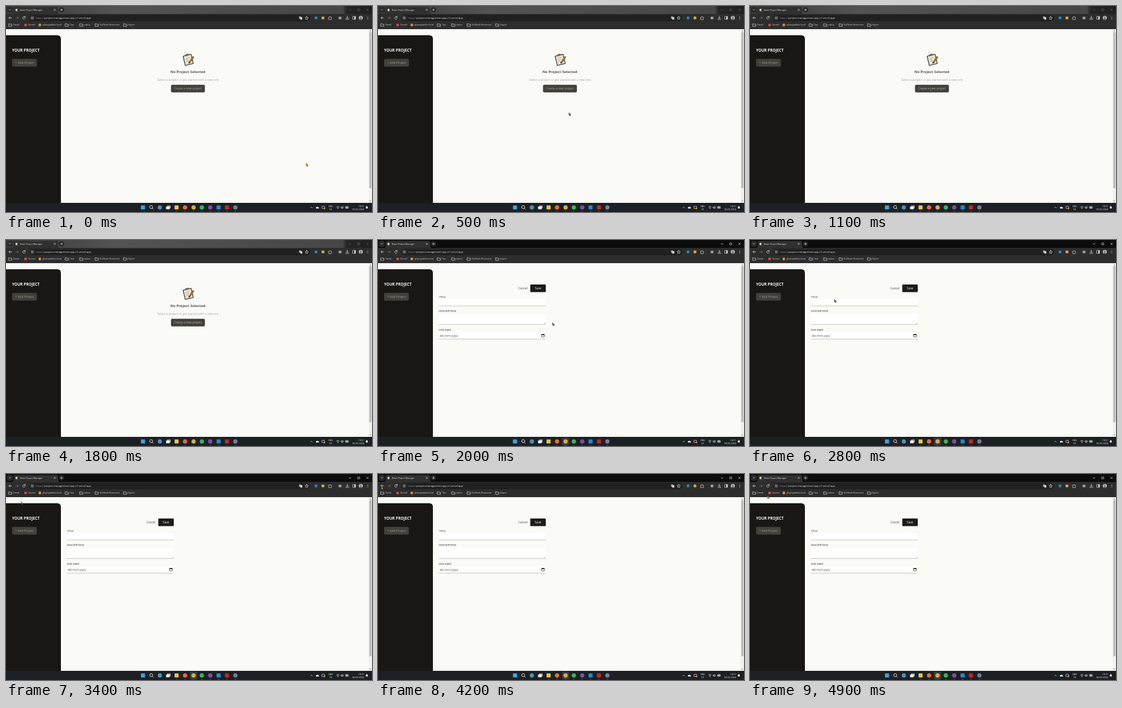
An HTML page for the animation above (5 s loop, 600 px wide and 338 px high).

```html
<!DOCTYPE html>
<html lang="en">
<head>
<meta charset="utf-8">
<title>Project manager demo</title>
<style>
html, body { margin: 0; width: 100%; height: 100%; overflow: hidden; background: #fafaf7; }
svg { display: block; width: 600px; height: 338px; font-family: "Open Sans", "Noto Sans", sans-serif; }
text { white-space: pre; }
.line { fill: none; stroke: #d8d8d8; stroke-width: .7; stroke-linecap: round; stroke-linejoin: round; }
</style>
</head>
<body>
<svg id="stage" viewBox="0 0 600 338"></svg>
<script>
const stage = document.getElementById('stage');

const rect = (x, y, w, h, fill, r = 0, more = '') =>
  `<rect x="${x}" y="${y}" width="${w}" height="${h}" rx="${r}" fill="${fill}" ${more}/>`;
const dot = (x, y, r, fill, more = '') => `<circle cx="${x}" cy="${y}" r="${r}" fill="${fill}" ${more}/>`;
const line = (d, more = '') => `<path class="line" d="${d}" ${more}/>`;
const text = (x, y, size, fill, str, weight = 400, anchor = 'start') =>
  `<text x="${x}" y="${y}" font-size="${size}" fill="${fill}" font-weight="${weight}" text-anchor="${anchor}">${str}</text>`;
const group = (id, body) => `<g id="${id}">${body}</g>`;

const folder = x => line(`M${x - 2.4} 29.2h1.8l.7.8h2.5v3.2h-5z`);

function clipboard(x, y, scale) {
  return `<g transform="translate(${x} ${y}) scale(${scale})">
    <g transform="rotate(-14)">
      ${rect(-6.8, -7.2, 13.6, 15.6, '#3d3427', 1)}
      ${rect(-5.7, -6, 11.4, 13.3, '#e9e2cc', .4)}
      ${rect(-2.8, -8.4, 5.6, 2.8, '#6d6657', .8)}
      <path d="M-3.8-2.5h6M-3.8 0h5M-3.8 2.5h4" stroke="#aaa38e" stroke-width=".6"/>
    </g>
    <path d="M8.3-4.3L1.8 4.8" stroke="#35291c" stroke-width="2.4"/>
    <path d="M8-4L2.2 4.2" stroke="#c79645" stroke-width="1.2"/>
    <path d="M.8 3.9L2.8 5.3L.6 6.6z" fill="#35291c"/>
  </g>`;
}

function tabStrip() {
  return rect(0, 0, 600, 13, '#0c0c0c')
    + group('inactive', rect(0, 0, 600, 13, 'url(#strip)'))
    + rect(1.5, 1.5, 9.5, 9.5, '#2b2b2b', 3)
    + line('M4.9 5.6l1.4 1.4l1.4-1.4')
    + `<path d="M10 13q2.5 0 2.5-3V4q0-2.5 2.5-2.5h68q2.5 0 2.5 2.5v6q0 3 2.5 3z" fill="#303030"/>`
    + clipboard(17.3, 6.4, .28)
    + text(22.7, 7.7, 3.55, '#e4e4e4', 'React Project Manager')
    + line('M78.8 5.1l2.4 2.4m0-2.4l-2.4 2.4')
    + dot(91, 6.3, 4.3, '#272727')
    + line('M89.3 6.3h3.4M91 4.6v3.4')
    + group('controls', line('M562.5 6.4h3M577 4.9h2.9v2.9h-2.9zM591.2 4.8l3 3m0-3l-3 3'));
}

function toolbar() {
  return rect(0, 13, 600, 25, '#2d2d2d')
    + line('M9.2 19.5H4.8m2-2l-2 2l2 2')
    + line('M15.8 19.5h4.4m-2-2l2 2l-2 2', 'opacity=".4"')
    + line('M31.4 18.4a2.2 2.2 0 1 0 .2 2M31.6 16.7v1.9h-1.9')
    + rect(37.5, 14.5, 461, 10.5, '#202020', 5.2)
    + dot(43, 19.6, 4, '#343434')
    + line('M41.4 18.5h1.2m1 0h1M41.4 20.7h.8m1 0h1.6')
    + text(49, 21.1, 4.18, '#e8e8e8', '<tspan fill="#909090">https://</tspan>project-management-app-v1.vercel.app')
    + rect(480.3, 17, 3.3, 4, '#9a9a9a', .4) + rect(482.4, 18.3, 3.3, 4, '#dedede', .4)
    + line('M493 17l.8 1.7l1.9.2l-1.4 1.3l.4 1.9l-1.7-1l-1.7 1l.4-1.9l-1.4-1.3l1.9-.2z')
    + dot(508.3, 19.5, 2.5, '#2383b8') + dot(519.6, 19.5, 2.5, '#d6a43c')
    + line('M529.3 18.2h1.4q.6-2 1.3 0h1.4v1.3q1.5.7 0 1.4v1.3h-4.1z')
    + rect(545.6, 17.7, 4, 3.8, '#dedede', .5) + dot(547.6, 19.6, 1, '#2d2d2d')
    + line('M559.5 16.7v3.6m-1.5-1.4l1.5 1.5l1.5-1.5M557.2 21v1h4.6v-1')
    + line('M568.8 17.2h4.2v4.6h-4.2z') + rect(571, 17, 2, 5, '#dedede')
    + dot(581.7, 19.5, 3.2, '#c9c4bd') + dot(581.7, 18.5, 1.1, '#493e38')
    + `<path d="M579.7 21.7q2-3 4 0q-2 1.4-4 0z" fill="#493e38"/>`
    + [17.7, 19.5, 21.3].map(y => dot(593, y, .55, '#dedede')).join('');
}

function bookmarks() {
  const items = [[12, 'Tarvik'], [36.5, 'Qumel'], [60, 'phpmyadmin local'], [105, 'Tavi'],
    [128, 'sarivu'], [153.5, 'FullStack Resources'], [200.5, 'Expire']];
  return items.map(([x, name]) => text(x, 32.4, 3.6, '#dddddd', name)).join('')
    + [7, 99.8, 123.5, 148.8, 195.5].map(folder).join('')
    + rect(30, 29.3, 4.2, 3.7, '#d94a3d') + dot(55.5, 31.1, 2.3, '#d9912f');
}

function page() {
  return rect(0, 38, 600, 285, '#fafaf7')
    + `<path d="M0 48h84q6 0 6 6v269H0z" fill="#181713"/>`
    + text(10, 74.8, 6.2, '#f5f5f0', 'YOUR PROJECT', 700)
    + rect(10, 86.8, 40.6, 12.6, '#42403a', 2)
    + text(15.1, 95, 5, '#9c978c', '+ Add Project')
    + rect(594.5, 38, 5.5, 285, '#f0f0ef')
    + rect(595.5, 43, 3.8, 256, '#bdbdbd')
    + '<path d="M596 41.6l1.4-1.7l1.4 1.7zM596 319.4l1.4 1.7l1.4-1.7z" fill="#777"/>';
}

function emptyView() {
  return clipboard(298.5, 87.7, 1.08)
    + text(298.2, 109.7, 5.93, '#57534e', 'No Project Selected', 700, 'middle')
    + text(298.4, 122.5, 4.82, '#aaa69f', 'Select a project or get started with a new one', 400, 'middle')
    + rect(270.5, 129.2, 55.5, 12.6, '#42403a', 2)
    + group('create', text(298.2, 137.2, 4.75, 'currentColor', 'Create a new project', 400, 'middle'));
}

function formView() {
  const field = (label, y, top, height) => text(100, y, 4.3, '#57534e', label, 600)
    + rect(100, top, 175, height, '#ffffff') + rect(100, top + height - .8, 175, .9, '#c2bfbb');
  return text(229.9, 81.1, 4.85, '#44403c', 'Cancel')
    + rect(249.6, 72.9, 25.4, 12.6, '#1c1b18', 1)
    + text(262.3, 81.1, 4.85, '#f5f5f0', 'Save', 400, 'middle')
    + field('TITLE', 95.2, 97.2, 11.3)
    + field('DESCRIPTION', 118.3, 121, 18)
    + line('M272.2 137.4l2-2m-.8 2l.8-.8', 'style="stroke:#777;stroke-width:.4"')
    + field('DUE DATE', 148.9, 151.3, 11.7)
    + text(101.2, 159, 5.2, '#57534e', 'dd-mm-yyyy')
    + line('M268.4 155h4.2v4h-4.2z', 'style="stroke:#222"') + rect(268, 154.5, 5, 1.6, '#222');
}

function taskbar() {
  const square = (x, fill) => rect(x - 3.3, 327.2, 6.6, 6.6, fill, .5);
  const disc = (x, fill) => dot(x, 330.5, 3.5, fill);
  return rect(0, 323, 600, 15, '#1c2025')
    + group('active', rect(301.5, 324.2, 12, 12.7, '#353a40', 1.5))
    + square(224.5, '#35a9e8')
    + dot(238, 330, 2.5, 'none', 'stroke="#e5e5e5" stroke-width=".9"') + line('M240 332l1.8 1.8')
    + disc(252.2, '#4e91b5')
    + rect(264, 327.2, 6, 4.7, '#9a9a9a', .4) + rect(262.4, 329, 6, 4.6, '#eeeeee', .4)
    + square(279.6, '#f0c449') + disc(293.5, '#ed6b32') + disc(307.5, '#d9ad37')
    + disc(321, '#35b957') + disc(334.8, '#7653a6') + square(348.5, '#2489cf')
    + square(362.2, '#c52725') + disc(376, '#718096')
    + [279.6, 293.5, 307.5, 321, 334.8, 348.5, 362.2, 376].map(x => rect(x - 1, 336, 2, .6, '#9a9a9a', .3)).join('')
    + line('M499.5 331.3l1.5-1.5l1.5 1.5')
    + '<path d="M508.2 332.2q-1.1-2 1-2.1q1.5-2 2.6.2q2 .2 1.2 1.9z" fill="#e5e5e5"/>'
    + line('M518.3 328.6h4v3.6h-4z') + dot(522, 332.2, 1.2, '#dc9b35')
    + text(532.3, 329.6, 3.5, '#eeeeee', 'ENG', 400, 'middle')
    + text(532.3, 334.7, 3.5, '#eeeeee', 'US', 400, 'middle')
    + line('M541.9 329.5q2.2-1.9 4.4 0M542.8 331q1.3-1.2 2.6 0') + dot(544.1, 332.4, .6, '#e5e5e5')
    + line('M549.4 329.8h1l1.3-1.2v4l-1.3-1.2h-1zM553 329.4q1 1.2 0 2.4')
    + line('M557 329h4.3v3H557z') + rect(557.6, 329.5, 2.5, 2, '#e5e5e5')
    + text(587, 329.6, 3.7, '#eeeeee', '18:51', 400, 'end')
    + text(587, 334.7, 3.7, '#eeeeee', '03-02-2024', 400, 'end')
    + '<path d="M589.3 332q.8-.7.8-2q0-1.8 1.4-1.8t1.4 1.8q0 1.3.8 2zM590.8 332.5h1.4l-.7.7z" fill="#e5e5e5"/>';
}

stage.innerHTML = `<defs><linearGradient id="strip">
    <stop stop-color="#383838"/><stop offset=".3" stop-color="#535353"/>
    <stop offset=".92" stop-color="#464646"/><stop offset=".93" stop-color="#252525"/>
    <stop offset="1" stop-color="#202020"/>
  </linearGradient></defs>`
  + tabStrip() + toolbar() + bookmarks() + page()
  + group('empty', emptyView()) + group('form', formView()) + taskbar()
  + '<path id="cursor" d="M0 0v4.5l1-.8l.8 1.6l.9-.5l-.7-1.4h1.4z" stroke="#24231b" stroke-width=".5"/>';

const $ = id => document.getElementById(id);
const show = (id, on) => $(id).setAttribute('display', on ? 'inline' : 'none');

// Pointer tip: time, x, y
const path = [
  [0, 492, 258], [300, 330, 192], [400, 330, 192], [500, 313, 175], [1000, 294.5, 136],
  [1600, 294.5, 136], [1800, 286, 135.5], [2600, 286, 135.5], [2800, 138.5, 97.5],
  [3000, 138.5, 97.5], [3200, 40.5, 67.5], [3300, 40.5, 67.5], [3400, 25, 45.5],
  [3900, 6.5, 22], [4200, 5.5, 20.5], [4600, 5.5, 20.5], [4900, 28.5, 35.5], [5000, 28.5, 35.5]
];

function pointer(t) {
  const i = path.findIndex(p => p[0] > t);
  const [a, b] = [path[i - 1], path[i]];
  const k = (t - a[0]) / (b[0] - a[0]);
  return [1, 2].map(n => a[n] + (b[n] - a[n]) * k);
}

function draw() {
  const t = Math.floor(performance.now() % 5000 / 100) * 100;
  const clicked = t >= 2000;
  show('inactive', !clicked);
  show('empty', !clicked);
  show('form', clicked);
  show('active', clicked);
  $('controls').setAttribute('opacity', clicked ? 1 : .35);
  $('create').setAttribute('color', t >= 1000 ? '#bcb6a8' : '#aaa498');
  $('cursor').setAttribute('transform', `translate(${pointer(t)})`);
  $('cursor').setAttribute('fill', t >= 300 && t < 3800 ? '#45a657' : '#e0b83c');
  requestAnimationFrame(draw);
}
draw();
</script>
</body>
</html>
```
